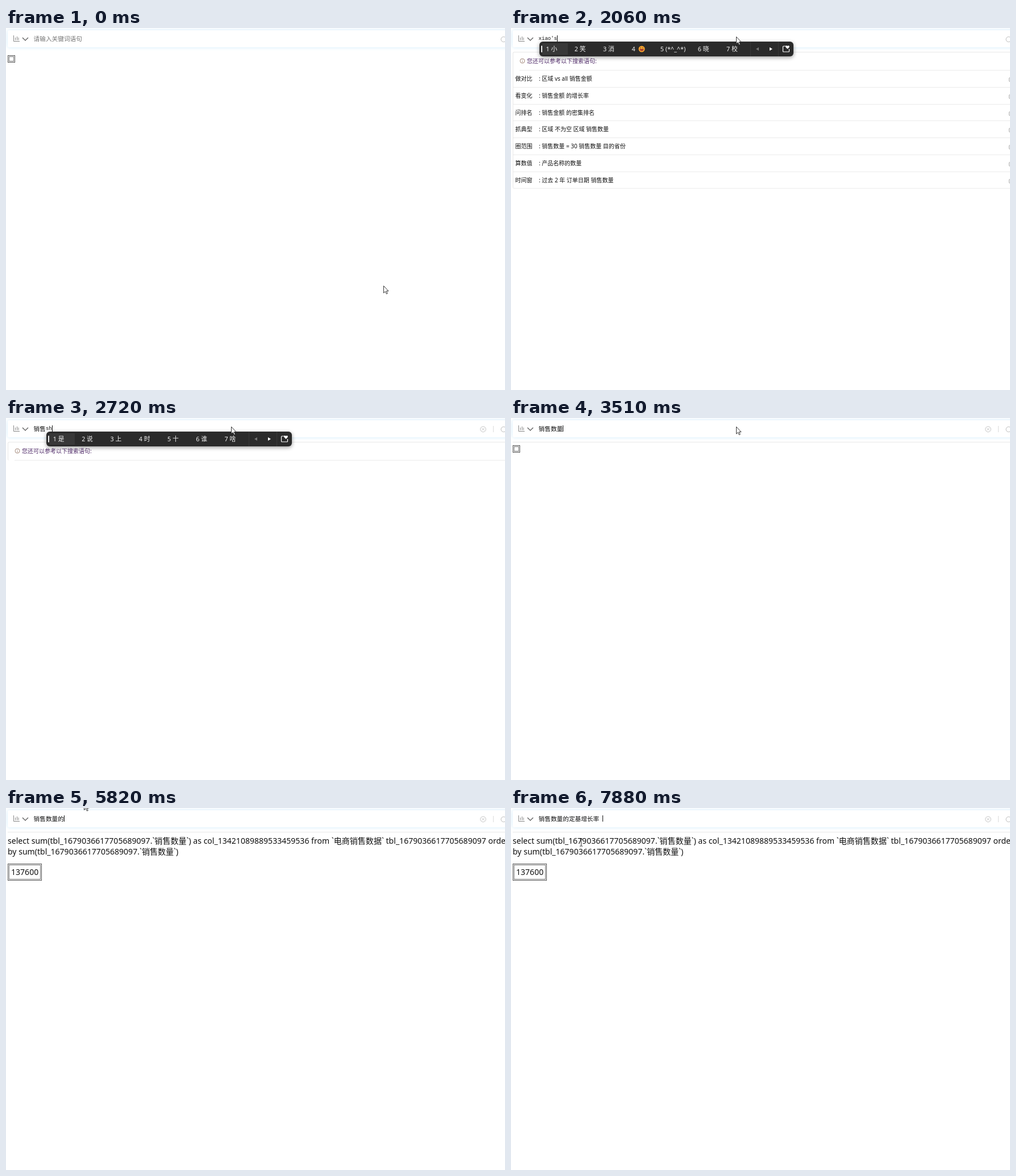
These frames come from a looping animation (878 px wide and 638 px high, 8000 ms). An HTML page:

```html
<!DOCTYPE html>
<html lang="zh-CN">
<head>
<meta charset="utf-8">
<title>搜索</title>
<style>
html, body { margin: 0; width: 100%; height: 100%; overflow: hidden; background: #fff; }
body { font: 10px/1 "Noto Sans", "Noto Sans CJK SC", "Noto Sans CJK", sans-serif; color: #111; }
#stage { position: relative; width: 878px; height: 638px; overflow: hidden; white-space: pre; }
#stage > * { position: absolute; left: 0; top: 0; }
[hidden] { display: none !important; }
svg { display: block; fill: none; }

#bar { left: 3px; top: 4px; width: 890px; height: 30px; border-radius: 3px; box-shadow: 0 0 6px #cfeafa; }
#field, #hint { left: 48.6px; top: 11px; height: 16px; line-height: 16px; font-size: 10.67px; display: flex; }
#hint { color: #757575; }
#comp { font: 9px/16px "Liberation Mono", monospace; }
#caret { width: 1px; height: 11px; margin-top: 2px; background: #111; }

#sql, #cell { font-size: 14.05px; line-height: 18.7px; }
#sql { left: 3px; top: 49px; }
#table { left: 3px; border: 1px solid #555; padding: 1px; background: #fff; }
#cell { border: 1px solid #777; padding: 3px; min-width: 1px; min-height: 1px; }
#cell:not(:empty) { padding: 2.5px 3px; }

#panel { left: 3px; top: 42px; width: 890px; background: #fff; border: solid #e8e8e8; border-width: 1px 0 0 1px; border-radius: 3px; }
.row { position: relative; height: 29.76px; line-height: 29px; padding-left: 11px; box-sizing: border-box; border-bottom: 1px solid #ebebeb; }
.row.hot { color: #1890ff; }
.tip { padding-left: 3.5px; }
.tip b { position: absolute; left: 45px; font-weight: 400; }
.tip i { position: absolute; left: 872px; top: 12px; width: 5px; height: 6px; border: 1px solid #aaa; border-radius: 2px; }
.head { height: 32px; line-height: 31px; margin-left: 11px; padding-left: 13px; color: #4f2a68; }
.head svg { position: absolute; left: 0; top: 10px; }

#ime { top: 24px; height: 26px; border-radius: 6px; background: #2b2b2b; box-shadow: 0 2px 7px rgba(0,0,0,.4); display: flex; color: #f4f4f4; font-size: 10.8px; line-height: 26px; }
.cand { width: 50.3px; padding-left: 12px; box-sizing: border-box; display: flex; position: relative; }
.cand.wide { width: 66px; }
.cand svg { margin: 7px 0 0 3px; }
.cand:first-child { background: linear-gradient(#383838, #383838) 5px 3px / 45px 20px no-repeat; }
.cand:first-child::before { content: ""; position: absolute; left: 3px; top: 7px; width: 2px; height: 12px; border-radius: 1px; background: #eee; }
</style>
</head>
<body>
<div id="stage">
  <div id="sql">select sum(tbl_1679036617705689097.`销售数量`) as col_13421089889533459536 from `电商销售数据` tbl_1679036617705689097 order
by sum(tbl_1679036617705689097.`销售数量`)</div>
  <div id="table"><div id="cell"></div></div>
  <div id="panel"></div>
  <div id="bar"></div>
  <svg width="878" height="40" stroke="#888">
    <path d="M13.5 13v10.5H24M16.5 17v4.5M19.5 15v6.500M22 17v4.5"/>
    <path d="M29 17l5 5 5-5" stroke="#555" stroke-width="1.2"/>
    <circle cx="875.5" cy="20" r="4.5" stroke="#bbb"/>
    <g id="clear" stroke="#c4c4c4"><circle cx="839.5" cy="19.8" r="4.8"/><path d="M837.5 17.800l4 4m0-4l-4 4"/><path d="M857.5 14v11" stroke="#ddd"/></g>
  </svg>
  <div id="field"><span id="text"></span><span id="comp"></span><span id="caret"></span></div>
  <div id="hint">请输入关键词语句</div>
  <div id="ime"></div>
  <svg id="arrow" width="12" height="17"><path d="M.5.5v12.5l2.900-2.700 2 4.400 1.900-.9-2-4.200h3.700z" fill="#fff" stroke="#222" stroke-width=".9"/></svg>
  <svg id="beam" width="8" height="15" style="left:120px;top:54px" stroke="#333"><path d="M1 .8h2l.5.7.5-.7h2M3.5 1v12M1 13.200h2l.5-.7.5.7h2"/></svg>
</div>
<script>
const $ = id => document.getElementById(id);
const LOOP = 8000, CJK = 10.67;

const row = s => `<div class="row">${s}</div>`;
const words = s => s.split('|').map(w => row(w + '-一个关键词')).join('');
const tip = s => {
  const [name, query] = s.split('|');
  return `<div class="row tip">${name}<b>: ${query}</b><i></i></div>`;
};
const head = `<div class="row head"><svg width="10" height="10" stroke="#a58a7c"><circle cx="5" cy="5" r="4"/><path d="M5 2.500v1M5 4.500v3"/></svg>您还可以参考以下搜索语句:</div>`;
const panels = {
  empty: '',
  head,
  tips: head + ['做对比|区域 vs all 销售金额', '看变化|销售金额 的增长率', '问排名|销售金额 的密集排名',
    '抓典型|区域 不为空 区域 销售数量', '圈范围|销售数量 = 30 销售数量 目的省份',
    '算数值|产品名称的数量', '时间窗|过去 2 年 订单日期 销售数量'].map(tip).join(''),
  next: words('在|的分布|的月 |的周 |的日 |最前的 |排名前 |排名第 ') +
    row('产品名称 不为空-系统提示.') + row('销售数量 != 26-系统提示.'),
  growth: words('定基增长率 |增长 ')
};

const face = `<svg width="12" height="12"><circle cx="6" cy="6" r="5.500" fill="#f9a52d"/><path d="M2.500 6h7a3.500 3.500 0 0 1-7 0z" fill="#a33b32"/><path d="M4 3v2M8 3v2" stroke="#543"/></svg>`;
const tail = `<svg width="80" height="26" stroke="#444"><path d="M4.500 0v26M53.500 0v26" stroke="#383838"/><path d="M19 10v6l-5-3z" fill="#777" stroke="none"/><path d="M38 10v6l5-3z" fill="#fff" stroke="none"/><path d="M67 8h-4.500q-1 0-1 1v8q0 1 1 1h9q1 0 1-1v-4" stroke="#fff" stroke-width="1.200"/><path d="M69.500 13l-3-3q-1-2.500 1-3 1.500 0 2 1 .5-1 2-1 2 .5 1 3z" fill="#fff" stroke="none"/></svg>`;
const imeHtml = list => list.split(' ').map((w, i) =>
  `<div class="cand${w.length > 2 ? ' wide' : ''}">${i + 1} ${w === '@' ? face : w}</div>`).join('') + tail;

// Each step overrides part of the state before it.
const steps = [[0, { text: '', comp: '', caret: 0, cand: '', panel: '', table: 48, value: '', sql: 0, clear: 0, pos: [664, 454], hot: -1, beam: 0 }]];
const at = (t, change) => steps.push([t, change]);
const type = (t, keys, lists) => keys.split(' ').forEach((comp, i) =>
  at(t + i * 110, { comp, caret: 1, cand: lists[Math.min(i, lists.length - 1)] }));

for (let i = 0; i < 6; i++) {
  const p = (i + 1) / 6, e = p * p * (3 - 2 * p);
  at(100 + i * 110, { pos: [664 - 268 * e, 454 - 439 * e], caret: +(i === 5) });
}
at(880, { panel: 'tips' });
at(1200, { caret: 0 });
type(1730, "x xi xiao xiao's xiao'sh xiao'sho xiao'shou", [
  '下 想 小 系 写 新 向', '系 洗 西 喜 细 吸 希', '小 笑 消 @ (*^_^*) 晓 校', '小 笑 消 @ (*^_^*) 晓 校',
  '小 笑 消 @ (*^_^*) 晓 校', '小 笑 消 @ (*^_^*) 晓 校', '销售 消瘦 小手 小 笑 消 校']);
at(2500, { text: '销售', comp: '', cand: '', clear: 1 });
at(2610, { panel: 'head' });
type(2610, "s sh shu shu'l shu'li shu'lian shu'liang", [
  '是 三 所 四 说 送 岁', '是 说 上 时 十 谁 啥', '数 书 属 树 输 熟 叔', '数量 熟了 树林 数 书 属 树',
  '数理 树立 梳理 数 书 属 树', '熟练 数 书 属 树 输 熟', '数量 数 书 属 树 输 熟']);
at(3380, { text: '销售数量', comp: '', cand: '', panel: 'empty', table: 86 });
at(3510, { table: 48 });
at(3830, { panel: 'next', table: 98, value: '137600', sql: 1 });
at(3940, { pos: [260, 2] });
at(4050, { pos: [150, -30], caret: 0 });
at(4280, { pos: [137, -12] });
at(4510, { caret: 1, pos: [137, -10.5] });
at(4600, { pos: [137, -9.5] });
at(5040, { caret: 0 });
type(5590, 'd de', ['的 都 到 大 对 多 等', '的 得 地 德 嘚 锝 底']);
at(5820, { text: '销售数量的', comp: '', cand: '', panel: 'empty' });
at(6140, { panel: 'growth' });
at(6240, { caret: 0 });
at(6780, { caret: 1 });
at(7220, { pos: [136, 10], caret: 0 });
at(7330, { pos: [132, 46], hot: 0 });
at(7440, { pos: [128, 79], hot: 1 });
at(7550, { pos: [125, 70] });
at(7670, { pos: [123, 58], hot: 0, caret: 1 });
at(7880, { text: '销售数量的定基增长率', comp: ' ', panel: 'empty', hot: -1, beam: 1 });
steps.sort((a, b) => a[0] - b[0]);

let shown = -1;
function draw(n) {
  const s = Object.assign({}, ...steps.slice(0, n + 1).map(x => x[1]));
  $('text').textContent = s.text;
  $('comp').textContent = s.comp;
  $('caret').style.visibility = s.caret ? 'visible' : 'hidden';
  $('hint').hidden = s.text || s.comp;
  $('ime').hidden = !s.cand;
  $('ime').style.left = 49.5 + s.text.length * CJK + 'px';
  $('ime').innerHTML = s.cand ? imeHtml(s.cand) : '';
  $('panel').hidden = !s.panel;
  $('panel').innerHTML = panels[s.panel] || '';
  if (s.hot >= 0) $('panel').children[s.hot].classList.add('hot');
  $('table').style.top = s.table + 'px';
  $('cell').textContent = s.value;
  $('sql').hidden = !s.sql;
  $('clear').style.display = s.clear ? '' : 'none';
  $('arrow').style.transform = `translate(${s.pos[0]}px, ${s.pos[1]}px)`;
  $('arrow').style.display = s.beam ? 'none' : '';
  $('beam').style.display = s.beam ? '' : 'none';
}

const start = performance.now();
function frame() {
  const t = (performance.now() - start) % LOOP;
  let n = 0;
  while (n + 1 < steps.length && steps[n + 1][0] <= t) n++;
  if (n !== shown) draw(shown = n);
  requestAnimationFrame(frame);
}
frame();
</script>
</body>
</html>
```
